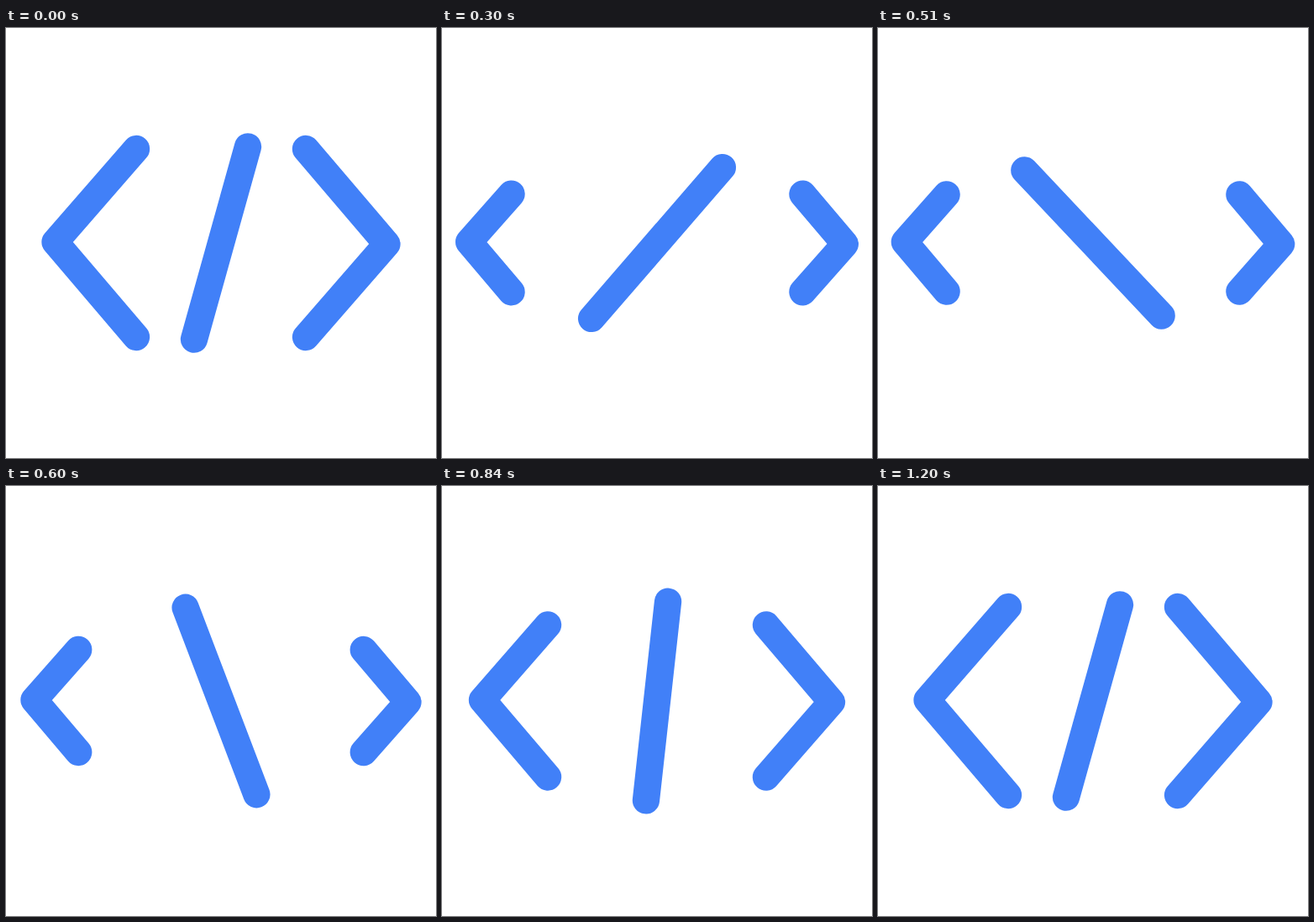
Write an HTML page that moves like this. It is 512 px wide and 512 px high and loops after 3.23 s.

```html
<!DOCTYPE html>
<html lang="en">
<head>
<meta charset="utf-8">
<title>Code icon</title>
<style>
html, body { margin: 0; width: 100%; height: 100%; overflow: hidden; background: #fff; }
svg { display: block; width: 100%; height: 100%; }
</style>
</head>
<body>
<svg viewBox="0 0 512 512" fill="none" stroke="#4180f8" stroke-width="32.3" stroke-linecap="round" stroke-linejoin="round">
  <polyline id="left"/>
  <polyline id="right" transform="rotate(180 256 256)"/>
  <line id="slash" x1="256" y1="137" x2="256" y2="375"/>
</svg>
<script>
const LOOP = 3230, STEP = 30, START = 20, PEAK = 400, END = 1200, TILT = 15.6;
const [left, right, slash] = ['left', 'right', 'slash'].map(id => document.getElementById(id));

// Cubic easing with flat ends: control points (x1, 0) and (x2, 1).
const ease = (x1, x2) => x => {
  if (x <= 0) return 0;
  if (x >= 1) return 1;
  let lo = 0, hi = 1, s = 0.5;
  for (let i = 0; i < 24; i++) {
    const r = 1 - s;
    if (3 * r * r * s * x1 + 3 * r * s * s * x2 + s * s * s < x) lo = s; else hi = s;
    s = (lo + hi) / 2;
  }
  return s * s * (3 - 2 * s);
};

const spin = ease(0.514, 0.093);
const shrink = ease(0.44, 0.075);
const grow = ease(0.59, 0.415);
const part = (t, from, to) => (t - from) / (to - from);

function draw(t) {
  const p = shrink(part(t, START, PEAK)) - grow(part(t, PEAK, END));
  const x = 155 - 75 * p, tip = 58.5 - 27.3 * p, half = 112 - 55.6 * p;
  const points = `${x},${256 - half} ${tip},254.8 ${x},${256 + half}`;
  left.setAttribute('points', points);
  right.setAttribute('points', points);
  const angle = TILT + 180 * spin(part(t, START, END));
  slash.setAttribute('transform', `rotate(${angle} 256 256)`);
}

const begin = performance.now();
function tick() {
  const t = (performance.now() - begin) % LOOP;
  draw(Math.min(END, Math.floor(t / STEP) * STEP));
  requestAnimationFrame(tick);
}
draw(0);
requestAnimationFrame(tick);
</script>
</body>
</html>
```
